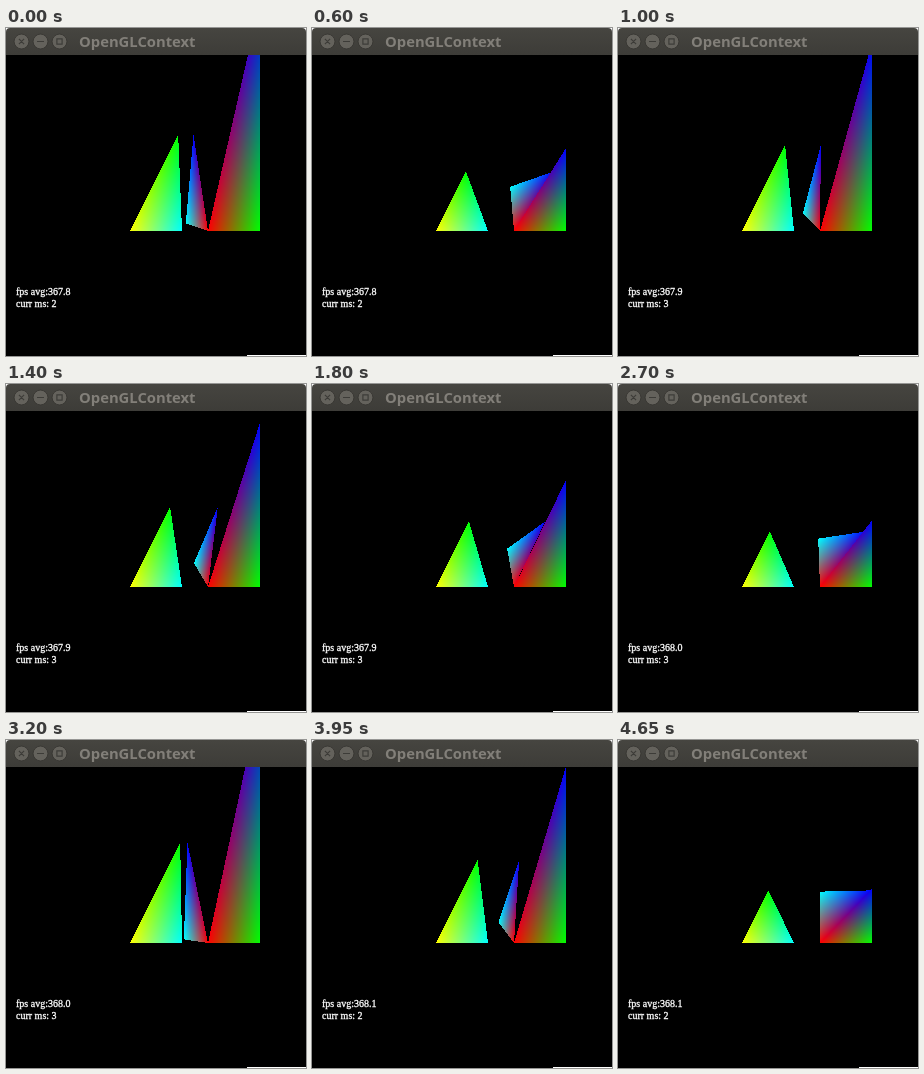
These frames come from a looping animation (300 px wide and 328 px high, 4700 ms). An HTML page with a canvas:

```html
<!DOCTYPE html>
<html>
<head>
<meta charset="utf-8">
<style>
html, body { margin: 0; width: 100%; height: 100%; overflow: hidden; background: #fff; }
#stage { position: absolute; left: 0; top: 0; width: 300px; height: 328px; overflow: hidden; }
svg, canvas { position: absolute; left: 0; top: 0; }
canvas { top: 27px; }
.title { font: bold 14.8px "Noto Sans", "Open Sans", sans-serif; fill: #827f79; }
.stats {
  font: 10px "Liberation Serif", "Times New Roman", serif;
  fill: #fff; stroke: #fff; stroke-width: 0.3px;
}
</style>
</head>
<body>
<div id="stage">
  <canvas id="view" width="300" height="301"></canvas>
  <svg width="300" height="328">
    <defs>
      <linearGradient id="bar" x2="0" y2="1">
        <stop offset="0" stop-color="#464540"/>
        <stop offset="1" stop-color="#3d3c38"/>
      </linearGradient>
    </defs>
    <path d="M0 27V4Q0 0 4 0H296Q300 0 300 4V27Z" fill="url(#bar)"/>
    <g fill="#64625c" stroke="#34332f" stroke-width="0.8">
      <circle cx="15.5" cy="13.5" r="7.4"/>
      <circle cx="34.5" cy="13.5" r="7.4"/>
      <circle cx="53.5" cy="13.5" r="7.4"/>
    </g>
    <path d="M12.9 10.9l5.2 5.2m0-5.2l-5.2 5.2M31 13.5h7M50.9 10.9h5.2v5.2h-5.2z"
      fill="none" stroke="#3d3c38" stroke-width="1.2"/>
    <text class="title" x="73" y="19">OpenGLContext</text>
    <text class="stats" id="fps" x="10" y="267"></text>
    <text class="stats" id="ms" x="10" y="279"></text>
    <path d="M241 327h59v1h-59z" fill="#fff"/>
  </svg>
</div>
<script>
const LOOP = 4700, STEP = 50, TOP = 27;
const view = document.getElementById('view');
const ctx = view.getContext('2d');
const fps = document.getElementById('fps');
const ms = document.getElementById('ms');

const RED = [255, 0, 0], GREEN = [0, 255, 0], BLUE = [0, 0, 255];
const YELLOW = [255, 255, 0], CYAN = [0, 255, 255];

// Each vertex: start x, y, end x, y, colour
const triangles = [
  [[0, 1, 1, 3, GREEN], [-1, -1, -1, -1, YELLOW], [1, -1, 1, -1, CYAN]],
  [[2, -1, 2, -1, RED], [4, 1, 1, 3, BLUE], [2, 1, 1, -1, CYAN]],
  [[2, -1, 2, -1, RED], [4, -1, 4, -1, GREEN], [4, 1, 4, 9, BLUE]]
];

// Time in ms, unfolded tween phase (one swing there and back is 2)
const phases = [
  [0, 0.853], [100, 0.865], [600, 1.851], [1400, 3.459], [2200, 5.07],
  [3200, 7.07], [3950, 8.6], [4650, 9.988], [4700, 10.088]
];

// Time in ms, average fps, current ms
const readings = [
  [0, '367.8', 2], [1000, '367.9', 3], [1900, '368.0', 3], [3500, '368.1', 2]
];

function tween(t) {
  let i = 1;
  while (i < phases.length - 1 && t > phases[i][0]) i++;
  const [t0, p0] = phases[i - 1], [t1, p1] = phases[i];
  const p = (p0 + (p1 - p0) * (t - t0) / (t1 - t0)) % 2;
  return p > 1 ? 2 - p : p;
}

function project([x0, y0, x1, y1], f) {
  return [
    150 + 26 * (x0 + (x1 - x0) * f),
    177 - TOP - 26 * (y0 + (y1 - y0) * f)
  ];
}

// Fills a triangle with its corner colours blended linearly
function shade(image, tri, f) {
  const [a, b, c] = tri.map(v => project(v, f));
  const [ca, cb, cc] = tri.map(v => v[4]);
  const area = (b[0] - a[0]) * (c[1] - a[1]) - (c[0] - a[0]) * (b[1] - a[1]);
  if (Math.abs(area) < 1e-6) return;
  const xs = [a[0], b[0], c[0]], ys = [a[1], b[1], c[1]];
  const left = Math.floor(Math.min(...xs)), right = Math.ceil(Math.max(...xs));
  const top = Math.max(0, Math.floor(Math.min(...ys)));
  const bottom = Math.min(image.height, Math.ceil(Math.max(...ys)));
  for (let y = top; y < bottom; y++) {
    for (let x = left; x < right; x++) {
      const px = x + 0.5 - a[0], py = y + 0.5 - a[1];
      const v = (px * (c[1] - a[1]) - (c[0] - a[0]) * py) / area;
      const w = ((b[0] - a[0]) * py - px * (b[1] - a[1])) / area;
      const u = 1 - v - w;
      if (u < 0 || v < 0 || w < 0) continue;
      const at = 4 * (y * image.width + x);
      for (let k = 0; k < 3; k++) {
        image.data[at + k] = u * ca[k] + v * cb[k] + w * cc[k];
      }
    }
  }
}

function draw(t) {
  const f = tween(t);
  ctx.fillStyle = '#000';
  ctx.fillRect(0, 0, view.width, view.height);
  const image = ctx.getImageData(0, 0, view.width, view.height);
  triangles.forEach(tri => shade(image, tri, f));
  ctx.putImageData(image, 0, 0);

  const [, avg, cur] = readings.filter(r => r[0] <= t).pop();
  fps.textContent = 'fps avg:' + avg;
  ms.textContent = 'curr ms: ' + cur;
}

const start = performance.now();
let last = -1;
function tick() {
  const t = Math.floor((performance.now() - start) % LOOP / STEP) * STEP;
  if (t !== last) draw(last = t);
  requestAnimationFrame(tick);
}
tick();
</script>
</body>
</html>
```
